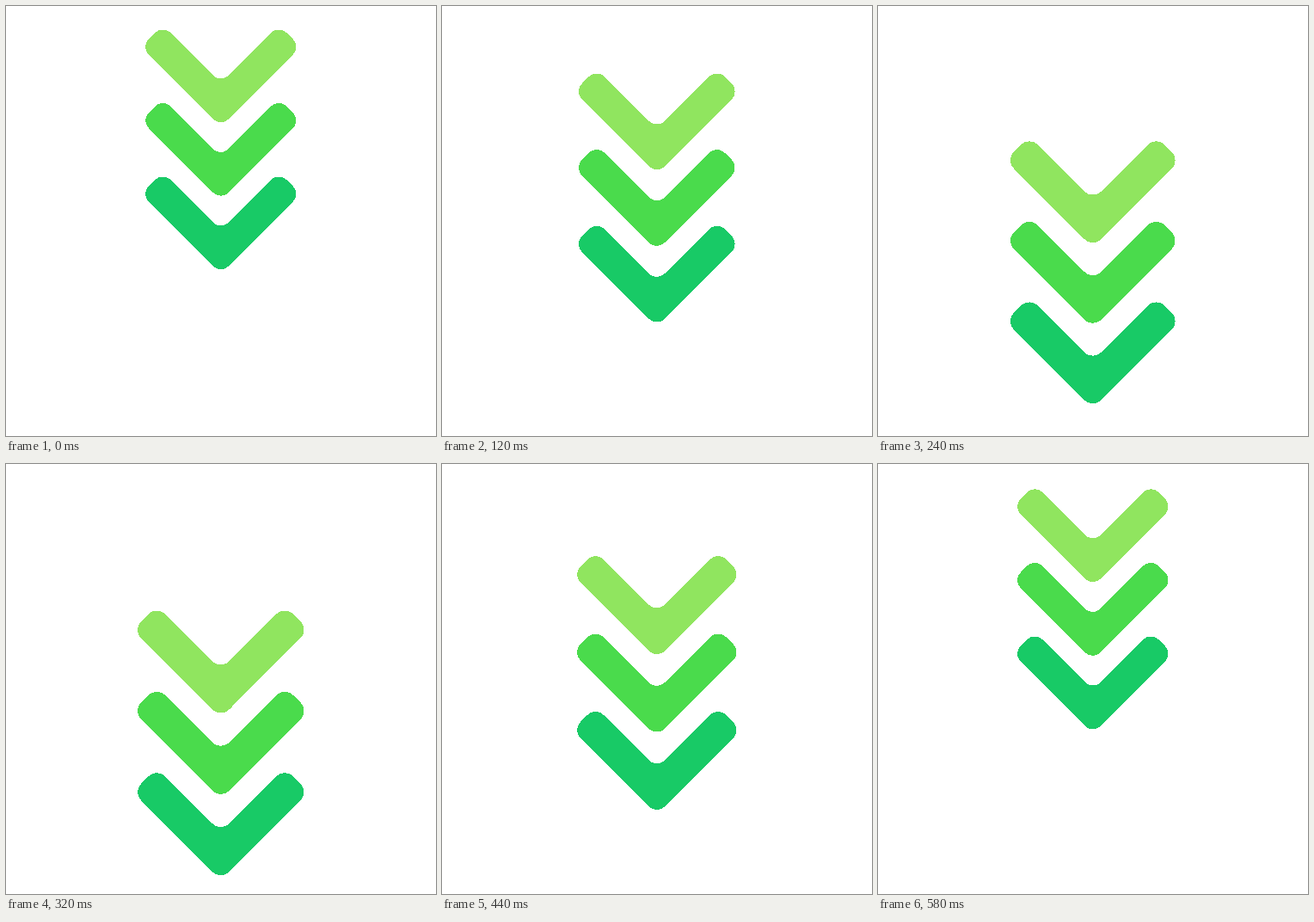
An HTML page for the animation above (0.6 s loop, 500 px wide and 500 px high).

```html
<!DOCTYPE html>
<html lang="en">
<head>
<meta charset="utf-8">
<title>Down chevrons</title>
<style>
  html, body { margin: 0; width: 100%; height: 100%; overflow: hidden; background: #fff; }
  svg { display: block; width: 100%; height: 100%; }
</style>
</head>
<body>
<svg viewBox="0 0 500 500" shape-rendering="crispEdges">
  <g id="stack"></g>
</svg>
<script>
  const LOOP = 600, TICK = 20;
  const GAP = 85.5, RADIUS = 12.8;
  const COLORS = ['#90e55f', '#4adb4c', '#18ca66'];
  // Sharp corners of one chevron, relative to the middle of its box
  const CORNERS = [[0, 58.9], [-92.8, -33.9], [-67.4, -59.3], [0, 8.1], [67.4, -59.3], [92.8, -33.9]];
  const stack = document.getElementById('stack');

  function toward(a, b, dist) {
    const k = dist / Math.hypot(b[0] - a[0], b[1] - a[1]);
    return [a[0] + (b[0] - a[0]) * k, a[1] + (b[1] - a[1]) * k];
  }

  // All corners are right angles, so each arc starts one radius away
  function roundedPath(points, r) {
    const n = points.length;
    return points.map((p, i) => {
      const prev = points[(i + n - 1) % n], next = points[(i + 1) % n];
      const a = toward(p, prev, r), b = toward(p, next, r);
      const cross = (p[0] - prev[0]) * (next[1] - p[1]) - (p[1] - prev[1]) * (next[0] - p[0]);
      return `${i ? 'L' : 'M'}${a} A${r} ${r} 0 0 ${cross > 0 ? 1 : 0} ${b}`;
    }).join(' ') + 'Z';
  }

  const shape = roundedPath(CORNERS, RADIUS);
  COLORS.forEach((color, i) => {
    const path = document.createElementNS('http://www.w3.org/2000/svg', 'path');
    path.setAttribute('d', shape);
    path.setAttribute('fill', color);
    path.setAttribute('transform', `translate(0 ${(i - 1) * GAP})`);
    stack.appendChild(path);
  });

  const smooth = x => x * x * (3 - 2 * x);

  function draw(now) {
    const t = Math.floor((now % LOOP) / TICK) * TICK;
    const p = smooth(1 - Math.abs(1 - 2 * t / LOOP));
    stack.setAttribute('transform', `translate(249.8 ${167 + 159.6 * p}) scale(${1 + 0.105 * p})`);
  }

  const start = performance.now();
  function loop() {
    draw(performance.now() - start);
    requestAnimationFrame(loop);
  }
  loop();
</script>
</body>
</html>
```
